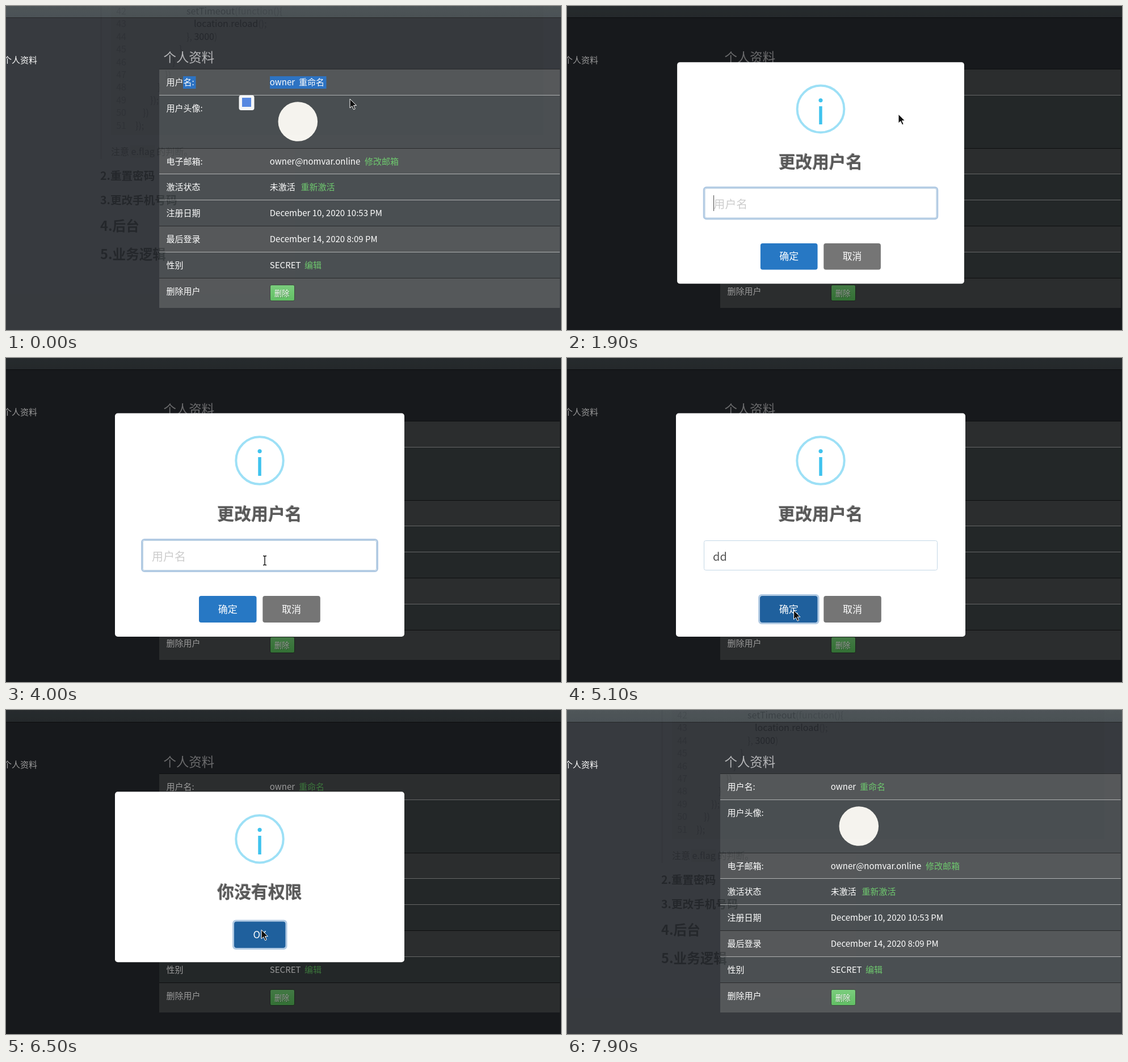
Write an HTML page that moves like this. It is 978 px wide and 572 px high and loops after 8000 ms.

```html
<!DOCTYPE html>
<html lang="zh-CN">
<head>
<meta charset="utf-8">
<title>个人资料</title>
<style>
  html, body { margin: 0; width: 100%; height: 100%; overflow: hidden; background: #26292e; }
  svg { display: block; width: 978px; height: 572px; }
  text { font-family: "Noto Sans CJK SC", "Noto Sans CJK", "Noto Sans", sans-serif; font-size: 15px; fill: #fff; white-space: pre; }
  .link { fill: #62c462; }
  .ghost text { fill: #111; }
  .ghost .code { font-size: 16px; }
  .ghost .faint { fill: #777; }
  .ghost .number { fill: #999; text-anchor: end; }
  .ghost .h3 { font-size: 19.6px; font-weight: 700; }
  .ghost .h2 { font-size: 23.6px; font-weight: 700; }
  .mid { text-anchor: middle; }
  .heading { font-size: 29.9px; font-weight: 600; text-anchor: middle; fill: #595959; }
  .heading.shade { fill: #000; fill-opacity: .3; }
  .info { font-size: 60px; fill: #3fc3ee; text-anchor: middle; }
  .button { font-size: 17px; font-weight: 500; text-anchor: middle; }
  .field { font-size: 20px; fill: #545454; }
  .ring { fill: none; stroke: #b1cae3; stroke-width: 3; }
</style>
</head>
<body>
<svg viewBox="0 0 978 572">
  <defs>
    <linearGradient id="green" x2="0" y2="1">
      <stop stop-color="#70c973"/><stop offset=".6" stop-color="#5fc161"/><stop offset="1" stop-color="#54b957"/>
    </linearGradient>
    <linearGradient id="bar" x2="0" y2="1">
      <stop stop-color="#40474b"/><stop offset="1" stop-color="#3c4347"/>
    </linearGradient>
  </defs>
  <rect width="978" height="572" fill="#26292e"/>
  <g id="page"></g>
  <g id="ghost" class="ghost" opacity=".08"></g>
  <rect id="dim" width="978" height="572"/>
  <g id="ask"></g>
  <g id="deny"></g>
  <g id="cursors" stroke-linejoin="round">
    <path id="arrow" d="M0 0V16L3.8 12.6L6.6 18.8L9.2 17.6L6.5 11.6H11.5Z" fill="#111" stroke="#fff"/>
    <g id="ibeam" fill="none">
      <path d="M-3 -8H-1L0 -7L1 -8H3M-3 8H-1L0 7L1 8H3M0 -7V7" stroke="#fff" stroke-width="3"/>
      <path d="M-3 -8H-1L0 -7L1 -8H3M-3 8H-1L0 7L1 8H3M0 -7V7" stroke="#111" stroke-width="1.4"/>
    </g>
    <path id="hand" d="M-1 -6Q1 -8 2 -5V1L8 3Q10 4 9 8L7 12H0L-5 5Q-5 2 -2 4L-1 5Z" fill="#111" stroke="#fff"/>
  </g>
</svg>
<script>
const $ = id => document.getElementById(id);
const text = (x, y, s, cls = '', extra = '') => `<text x="${x}" y="${y}" class="${cls}" ${extra}>${s}</text>`;
const rect = (x, y, w, h, fill, extra = '') => `<rect x="${x}" y="${y}" width="${w}" height="${h}" fill="${fill}" ${extra}/>`;

// top, height, striped, top line, label, value, link, link x
const LIGHT = '#a9abac', DARK = '#17191b';
const rows = [
  [112, 45, true, DARK, '用户名:', 'owner', '重命名', 516],
  [158, 93, false, LIGHT, '用户头像:', '', '', 0],
  [252, 44, true, DARK, '电子邮箱:', 'owner@nomvar.online', '修改邮箱', 632],
  [297, 45, false, LIGHT, '激活状态', '未激活', '重新激活', 519.5],
  [343, 45, false, LIGHT, '注册日期', 'December 10, 2020 10:53 PM', '', 0],
  [389, 45, true, DARK, '最后登录', 'December 14, 2020 8:09 PM', '', 0],
  [435, 45, false, LIGHT, '性别', 'SECRET', '编辑', 526],
  [481, 52, true, DARK, '删除用户', '', '', 0]
];

function buildPage() {
  let back = rect(0, -1, 978, 21, 'url(#bar)') + rect(0, 20, 978, 1, '#141618');
  let front = text(-5, 101, '个人资料') + text(277.5, 98.5, '个人资料', '', 'style="font-size:22.4px;fill:#b0b1b3"');
  for (const [y, h, striped, line, label, value, link, linkX] of rows) {
    back += rect(270, y, 706, h, striped ? '#474a4c' : '#3b4043') + rect(270, y - 1, 706, 1, line);
    const base = y + 28;
    front += text(282.5, base, label) + text(464.8, base, value) + text(linkX, base, link, 'link');
  }
  const selection = `<g id="selection">${rect(312, 124, 22.5, 22, '#1c68bf')}${rect(465, 124, 99.5, 22, '#1c68bf')}
    ${text(297.5 + 15, 140, '名:')}${text(464.8, 140, 'owner')}${text(516, 140, '重命名')}
    ${rect(410.5, 157.5, 27, 26.5, '#f6f7f8', 'rx="4"')}${rect(416, 162, 16, 16, '#4a7fe0')}</g>`;
  const remove = rect(465.5, 492.5, 43, 28, 'url(#green)', 'rx="2.5" stroke="#2c3a2e"') +
    text(474, 513, '删除', '', 'style="font-size:13.2px;fill:#000" opacity=".3"') +
    text(473, 512, '删除', '', 'style="font-size:13.2px"');
  return back + front + '<circle cx="514.3" cy="204" r="34.8" fill="#f6f4ee"/>' + remove + selection;
}

function buildGhost() {
  const faint = s => `<tspan class="faint">${s}</tspan>`;
  const code = [
    [318, 'setTimeout' + faint('(function(){')], [331, 'location' + faint('.') + 'reload' + faint('();')],
    [318, faint('},') + ' 3000' + faint(')')], [305, faint('}')], [293, faint('}')],
    [280, faint('})')], [267, faint('}')], [254, faint('});')], [241, faint('})')], [228, faint('});')]
  ];
  let out = rect(0, 0, 978, 572, '#fff') + rect(185, 0, 762, 228, '#f0f0f0') + rect(166, 0, 3, 270, '#ddd');
  code.forEach(([x, s], i) => {
    const y = 15 + i * 22.4;
    out += text(212, y, 42 + i, 'code number') + text(x, y, s, 'code');
  });
  return out + rect(219, 246, 44, 22, '#eee') + text(185, 262.5, '注意 e.flag 的判断。', 'code', 'style="fill:#555"') +
    text(166, 306.5, '2.重置密码', 'h3') + text(166, 349.5, '3.更改手机号码', 'h3') +
    text(166, 397, '4.后台', 'h2') + text(166, 447, '5.业务逻辑', 'h2');
}

const dialog = (top, height, title) => rect(192, top, 510, height, '#fff', 'rx="5"') +
  `<circle cx="447" cy="${top + 83.5}" r="41.7" fill="none" stroke="#9de0f6" stroke-width="4"/>` +
  text(447, top + 110.3, 'i', 'info') +
  text(446, top + 187.2, title, 'heading shade') + text(447, top + 188.2, title, 'heading');

const button = (id, x, y, w, h, fill, label) => rect(x, y, w, h, fill, `rx="4" id="${id}"`) +
  text(x + w / 2, y + h / 2 + 6.3, label, 'button');

const ring = (id, x, y, w, h) => `<rect id="${id}" class="ring" x="${x - 1.5}" y="${y - 1.5}" width="${w + 3}" height="${h + 3}" rx="4.5"/>`;

$('page').innerHTML = buildPage();
$('ghost').innerHTML = buildGhost();
$('ask').innerHTML = dialog(97.5, 394.5, '更改用户名') +
  rect(241.5, 322.5, 411, 52, '#fff', 'rx="3" stroke="#c4d7e6"') + ring('fieldRing', 241, 322, 412, 53) +
  text(257, 357.7, '用户名', 'field', 'id="hint" style="fill:#ccc"') + text(257, 357.5, '', 'field', 'id="typed"') +
  rect(256.5, 334.5, 1, 28, '#444', 'id="caret"') +
  ring('confirmRing', 340, 420, 101.5, 47) +
  button('confirm', 340, 420, 101.5, 47, '#2778c4', '确定') + button('cancel', 452.3, 420, 101.5, 47, '#757575', '取消');
$('deny').innerHTML = dialog(144.2, 301, '你没有权限') +
  ring('okRing', 402, 373.5, 90.5, 46.5) + button('ok', 402, 373.5, 90.5, 46.5, '#2778c4', 'OK');

// time, x, y, shape from then on
const path = [
  [0, 606, 164, 'arrow'], [200, 606, 164, 'arrow'], [700, 450, 190, 'arrow'], [1100, 338, 205, 'arrow'],
  [1300, 590, 170, 'arrow'], [1400, 540, 135, 'hand'], [1700, 540, 135, 'arrow'], [1900, 584, 191, 'arrow'],
  [2400, 484, 325, 'ibeam'], [3100, 484, 325, 'ibeam'], [3200, 456, 358.5, 'ibeam'], [3400, 456, 358.5, ''],
  [4000, 456, 357.5, 'ibeam'], [4600, 456, 357.5, 'arrow'], [4900, 399.5, 445.5, 'arrow'], [5400, 399.5, 445.5, 'arrow'],
  [5500, 441.5, 297.5, 'ibeam'], [5600, 441.5, 297.5, 'ibeam'], [5700, 442.5, 297.5, 'ibeam'], [5800, 442.5, 297.5, 'ibeam'],
  [5900, 449.5, 361, 'arrow'], [6000, 449.5, 361, 'arrow'], [6200, 450, 388, 'arrow'], [6700, 450, 388, 'arrow'],
  [7300, 63.5, -5, 'arrow'], [7400, 63.5, -5, ''], [8000, 63.5, -5, '']
];

const clamp = v => Math.min(1, Math.max(0, v));
const show = (id, on) => { $(id).style.display = on ? '' : 'none'; };
const within = (t, a, b) => t >= a && t < b;

// cubic-bezier(.25, .1, .25, 1)
function ease(x) {
  x = clamp(x);
  const curve = (a, b, u) => 3 * a * u * (1 - u) ** 2 + 3 * b * u * u * (1 - u) + u ** 3;
  let lo = 0, hi = 1;
  for (let i = 0; i < 24; i++) {
    const u = (lo + hi) / 2;
    if (curve(.25, .25, u) < x) lo = u; else hi = u;
  }
  return curve(.1, 1, lo);
}

function popScale(p) {
  if (p < .45) return .7 + .35 * ease(p / .45);
  if (p < .8) return 1.05 - .1 * ease((p - .45) / .35);
  return .95 + .05 * ease((p - .8) / .2);
}

function zoom(id, scale, opacity = 1) {
  $(id).setAttribute('transform', `translate(447 294.75) scale(${scale}) translate(-447 -294.75)`);
  $(id).setAttribute('opacity', opacity);
}

function moveCursor(t) {
  const i = path.findLastIndex(k => k[0] <= t);
  const [t0, x0, y0, shape] = path[i];
  const [t1, x1, y1] = path[i + 1];
  const p = (t - t0) / (t1 - t0);
  for (const id of ['arrow', 'ibeam', 'hand']) show(id, id === shape);
  $('cursors').setAttribute('transform', `translate(${x0 + (x1 - x0) * p} ${y0 + (y1 - y0) * p})`);
}

function draw(t) {
  $('page').setAttribute('transform', `translate(0 ${t < 5200 ? 0 : 1})`);
  show('ghost', t < 300 || t >= 7900);
  show('selection', t < 400);

  const opening = ease((t - 1628) / 100), closing = ease((t - 6595) / 100);
  $('dim').setAttribute('opacity', within(t, 5200, 5500) ? 0 : .4 * opening * (1 - closing));

  show('ask', within(t, 1700, 5200));
  zoom('ask', popScale(clamp((t - 1628) / 300)));
  const typed = t < 4400 ? '' : t < 4600 ? 'd' : 'dd';
  $('typed').textContent = typed;
  show('hint', !typed);
  show('caret', t < 3800 || within(t, 4400, 5000));
  $('caret').setAttribute('x', 256.5 + typed.length * 12.4);
  show('fieldRing', t < 5100);
  show('confirmRing', t >= 5100);
  $('confirm').setAttribute('fill', t < 4900 ? '#2778c4' : t < 5100 ? '#236cb0' : '#1f609d');

  show('deny', within(t, 5500, 6800));
  const gone = ease((t - 6595) / 150);
  zoom('deny', 1 - gone / 2, 1 - gone);
  $('ok').setAttribute('fill', t < 6100 ? '#2778c4' : t < 6500 ? '#236cb0' : '#1f609d');

  moveCursor(t);
}

const start = performance.now();
let last = -1;
function tick() {
  // the picture is refreshed ten times a second
  const t = Math.floor(((performance.now() - start) % 8000) / 100) * 100;
  if (t !== last) draw(last = t);
  requestAnimationFrame(tick);
}
tick();
</script>
</body>
</html>
```
